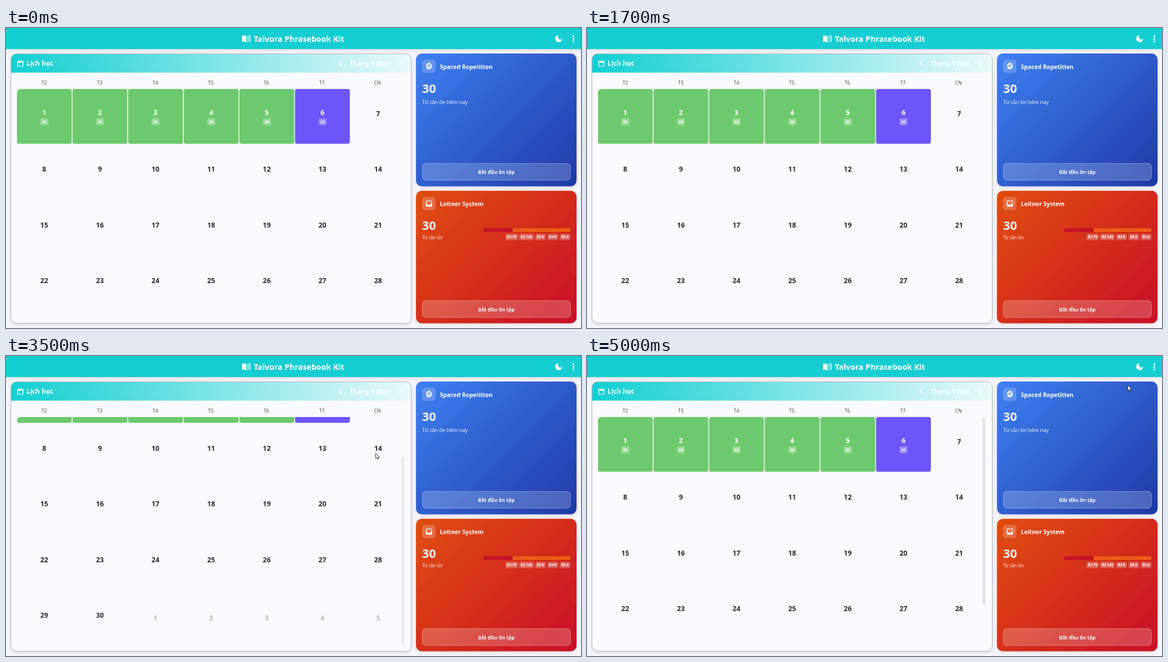
Write an HTML page that moves like this. It is 1035 by 541 pixels and loops after 5100 ms.

```html
<!DOCTYPE html>
<html lang="vi">
<head>
<meta charset="utf-8">
<title>Talvora Phrasebook Kit</title>
<style>
  html, body { margin: 0; width: 100%; height: 100%; overflow: hidden; background: #f7f6fb; }
  svg { display: block; width: 1035px; height: 541px; }
  text { font-family: "Noto Sans", "Open Sans", sans-serif; font-weight: 700; fill: #fff; }
  .plain { font-weight: 400; }
  .line { fill: none; stroke: #fff; stroke-linecap: round; stroke-linejoin: round; }
</style>
</head>
<body>
<svg viewBox="0 0 1035 541">
  <defs>
    <linearGradient id="head"><stop stop-color="#12cfd2"/><stop offset="1" stop-color="#e9f9fa"/></linearGradient>
    <linearGradient id="blue" gradientUnits="userSpaceOnUse" x1="750.5" y1="33.5" x2="1014.5" y2="297.5">
      <stop stop-color="#3f80f2"/><stop offset="1" stop-color="#1e3aa6"/>
    </linearGradient>
    <linearGradient id="red" gradientUnits="userSpaceOnUse" x1="750.5" y1="281" x2="1014.5" y2="545">
      <stop stop-color="#e04e10"/><stop offset="1" stop-color="#c90f27"/>
    </linearGradient>
    <filter id="soft" x="-10%" y="-10%" width="120%" height="125%">
      <feDropShadow dx="0" dy="2" stdDeviation="3" flood-color="#000" flood-opacity=".13"/>
    </filter>
    <clipPath id="view"><rect x="19.5" y="110" width="699" height="411" rx="7"/></clipPath>
    <clipPath id="card"><rect x="9" y="46.5" width="720.5" height="486" rx="10"/></clipPath>
  </defs>

  <rect width="1035" height="541" fill="#f7f6fb"/>
  <rect width="1035" height="38" fill="#12ced2" filter="url(#soft)"/>

  <!-- book -->
  <path d="M432.5 15.2Q429 12.6 425 14V25Q429 23.6 432.5 25.8Q436 23.6 440 25V14Q436 12.6 432.5 15.2Z" fill="#fff"/>
  <path d="M432.7 15.5V24.8Q435.7 23 438.6 23.8V15Q435.4 14.2 432.7 15.5Z" fill="#12ced2"/>
  <path class="line" d="M434.3 17.4Q436 16.6 437.4 16.8M434.3 19.5Q436 18.7 437.4 18.9M434.3 21.6Q436 20.8 437.4 21" stroke-width=".9"/>
  <!-- moon and menu -->
  <path d="M994.8 12.9A6.3 6.3 0 1 0 1001 19.5A3.9 3.9 0 1 1 994.8 12.9Z" fill="#fff"/>
  <g fill="#fff"><circle cx="1021.3" cy="14.6" r="1.6"/><circle cx="1021.3" cy="19.3" r="1.6"/><circle cx="1021.3" cy="24" r="1.6"/></g>

  <!-- calendar panel -->
  <rect x="9" y="46.5" width="720.5" height="486" rx="10" fill="#faf9fd" filter="url(#soft)"/>
  <rect x="9" y="46" width="721" height="34.5" fill="url(#head)" clip-path="url(#card)"/>
  <rect x="9" y="46.5" width="720.5" height="486" rx="10" fill="none" stroke="#b4b6ba"/>
  <path class="line" d="M21 60.3H30.6V69H21ZM23.2 58.6V60M28.4 58.6V60" stroke-width="1.2"/>
  <path d="M20.6 59.8H31V62.4H20.6Z" fill="#fff"/>
  <path class="line" d="M603.8 59.5L599.4 63.8L603.8 68.1M706.8 59.5L711.2 63.8L706.8 68.1" stroke-width="1.6"/>
  <g clip-path="url(#view)"><g id="days"></g></g>
  <rect id="bar" x="711.8" width="5.2" height="338" rx="2.4" fill="#e4e3e7"/>

  <!-- study panels -->
  <rect x="738" y="46" width="289" height="239.5" rx="11" fill="url(#blue)" filter="url(#soft)"/>
  <rect x="738" y="293.5" width="289" height="239" rx="11" fill="url(#red)" filter="url(#soft)"/>
  <g id="panels"></g>
  <path d="M757.4 74V70.7A4.7 4.7 0 1 1 765.8 68.1L767 70.2H765.8V72.4H763.7V74Z" fill="#fff"/>
  <circle cx="761.4" cy="68" r="1.9" fill="none" stroke="#4a80ee" stroke-width="1.3"/>
  <rect x="756.2" y="311.9" width="9.8" height="9.6" rx="1" class="line" stroke-width="1.4"/>
  <path d="M756 317.6H759Q761.1 320.6 763.2 317.6H766.2V321.8H756Z" fill="#fff"/>
  <rect x="859" y="361" width="157" height="7" rx="1.5" fill="#eb5a18"/>
  <rect x="859" y="361" width="53" height="7" rx="1.5" fill="#ca1128"/>
  <g id="labels"></g>

  <path id="cursor" d="M0 0V9.4L2.2 7.4L3.8 11L5.4 10.3L3.9 6.8H6.8Z" fill="#fff" stroke="#222" stroke-width=".9" stroke-linejoin="round"/>
</svg>
<script>
const LOOP = 5100, STEP = 100, PITCH = 100.15, TOP = 110;
const byId = id => document.getElementById(id);

function add(parent, tag, attrs, content) {
  const el = document.createElementNS("http://www.w3.org/2000/svg", tag);
  for (const key in attrs) el.setAttribute(key, attrs[key]);
  if (content !== undefined) el.textContent = content;
  parent.appendChild(el);
}

// y is the middle of the capital letters
function label(parent, content, x, y, size, extra = {}) {
  add(parent, "text", { x, y: y + size * 0.357, "font-size": size, ...extra }, content);
}

function box(parent, x, y, width, height, rx, extra = {}) {
  add(parent, "rect", { x, y, width, height, rx, fill: "#fff", "fill-opacity": 0.2, ...extra });
}

const mid = { "text-anchor": "middle" };
const labels = byId("labels"), panels = byId("panels"), days = byId("days");

label(labels, "Talvora Phrasebook Kit", 446, 19.6, 14.2);
label(labels, "Lịch học", 37, 63.7, 11.8);
label(labels, "Tháng 9 2025", 654.7, 64, 11, mid);
["T2", "T3", "T4", "T5", "T6", "T7", "CN"].forEach((name, i) =>
  label(labels, name, 68.8 + i * 99.97, 98.6, 8.7, { ...mid, style: "fill:#4a4d58;font-weight:500" }));

function panel(y, title, note, noteY, noteSize, countY) {
  box(panels, 749, y + 11, 24, 24, 5);
  box(panels, 749.5, y + 198.2, 266.5, 30.3, 6, { stroke: "#fff", "stroke-opacity": 0.35 });
  label(labels, title, 781, y + 23.8, 10.5);
  label(labels, "30", 749, countY, 22);
  label(labels, note, 749, noteY, noteSize, { class: "plain", "fill-opacity": 0.92 });
  label(labels, "Bắt đầu ôn tập", 882.5, y + 214, 8.95, mid);
}
panel(46, "Spaced Repetition", "Từ cần ôn hôm nay", 133.5, 9.2, 108.8);
panel(293.5, "Leitner System", "Từ cần ôn", 378, 8, 355.8);

[["B1:70", 899, 22.5], ["B2:140", 923.5, 26.5], ["B3:0", 952.5, 19.5], ["B4:0", 974.5, 19.5], ["B5:0", 996.5, 19.5]]
  .forEach(([name, x, w]) => {
    box(panels, x, 371, w, 11.8, 3, { "fill-opacity": 0.25 });
    label(labels, name, x + w / 2, 377, 6.4, mid);
  });

for (let i = 0; i < 35; i++) {
  const left = 19.5 + (i % 7) * PITCH, top = TOP + Math.floor(i / 7) * 100.25;
  const x = left + 49.3;
  if (i < 6) {
    box(days, left, top, 98.7, 98.7, 4, { fill: i < 5 ? "#6dc96d" : "#6c56fa", "fill-opacity": 1 });
    box(days, x - 7.2, top + 52.8, 14.6, 13, 3, { "fill-opacity": 0.27 });
    label(days, i + 1, x, top + 42.3, 12.5, mid);
    label(days, 30, x, top + 59.6, 7.4, mid);
  } else if (i < 30) {
    label(days, i + 1, x, top + 44.8, 12.3, { ...mid, style: "fill:#222838" });
    add(days, "circle", { cx: x, cy: top + 59, r: 1, fill: "#ecebf1" });
  } else {
    label(days, i - 29, x, top + 49.8, 12.3, { ...mid, style: "fill:#b9b9be" });
  }
}

// rows of [time, ...values]
const scrollKeys = [[2600, 0], [2700, 50], [2800, 88.2], [3700, 88.2], [3800, 34.3], [3900, 6], [4000, 0]];
const fadeKeys = [[2600, 0], [2700, 0.5], [2800, 1], [3400, 1], [3700, 0], [3800, 0.35], [4000, 1]];
const cursorKeys = [[2100, 1000, 70], [2300, 800, 135], [2500, 665.5, 171], [2600, 665.5, 172], [2800, 665.5, 173.6],
  [3800, 665.5, 176.2], [4400, 666, 176], [4700, 800, 122], [5000, 973.5, 53]];

function at(keys, t) {
  const n = keys.findIndex(k => k[0] > t);
  if (n < 0) return keys[keys.length - 1].slice(1);
  if (n === 0) return keys[0].slice(1);
  const a = keys[n - 1], b = keys[n], f = (t - a[0]) / (b[0] - a[0]);
  return a.slice(1).map((v, i) => v + (b[i + 1] - v) * f);
}

const bar = byId("bar"), cursor = byId("cursor");
function draw(t) {
  const [scroll] = at(scrollKeys, t), [fade] = at(fadeKeys, t), [x, y] = at(cursorKeys, t);
  days.setAttribute("transform", `translate(0 ${-scroll})`);
  bar.setAttribute("y", 110.8 + scroll * 0.81);
  bar.setAttribute("opacity", fade);
  cursor.setAttribute("transform", `translate(${x} ${y})`);
  cursor.setAttribute("visibility", t < 2100 ? "hidden" : "visible");
}

const start = performance.now();
function tick() {
  const t = (performance.now() - start) % LOOP;
  draw(Math.floor(t / STEP) * STEP);
  requestAnimationFrame(tick);
}
tick();
</script>
</body>
</html>
```
